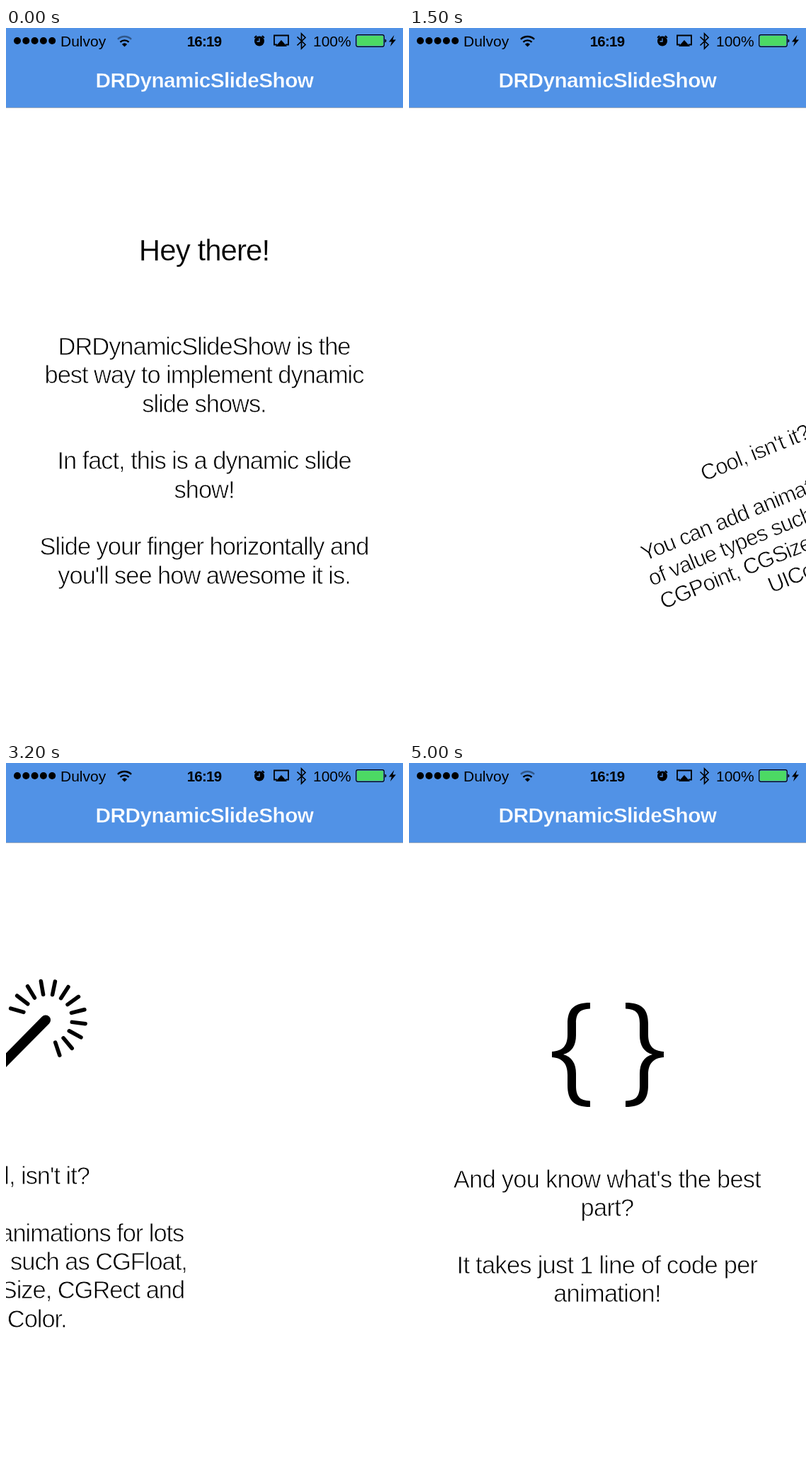
Write an HTML page that moves like this. It is 561 px wide and 997 px high and loops after 5.1 s.

```html
<!DOCTYPE html>
<html lang="en">
<head>
<meta charset="utf-8">
<title>DRDynamicSlideShow</title>
<style>
  html, body { margin: 0; width: 100%; height: 100%; overflow: hidden; background: #fff; }
  svg { display: block; width: 100%; height: 100%; }
  text { font-family: "Liberation Sans", Arial, sans-serif; }
  .mid { text-anchor: middle; }
  .copy text { font-size: 34.5px; letter-spacing: -1.05px; stroke: #fff; stroke-width: .8px; }
  #outro text { letter-spacing: -.75px; }
  .head { font-size: 42px; letter-spacing: -.95px; stroke: #fff; stroke-width: .3px; }
  .nav { font-size: 29.8px; font-weight: 700; letter-spacing: -.55px; fill: #fff; stroke: #5192e6; stroke-width: .4px; }
  .status { font-size: 21px; }
  .clock { font-size: 20.4px; font-weight: 700; letter-spacing: -.7px; }
</style>
</head>
<body>
<svg viewBox="0 0 561 997">
  <rect width="561" height="997" fill="#fff"/>

  <text id="title" class="head mid" x="280" y="328">Hey there!</text>
  <g id="intro" class="copy mid"></g>

  <g id="wand" stroke="#000" stroke-linecap="round">
    <path d="M204 468L308.5 362.5" stroke-width="14"/>
    <path id="rays" stroke-width="5.5"/>
  </g>
  <g id="tip" class="copy mid"></g>

  <g id="braces">
    <path id="brace" d="M256 338C233 338 224 347 224 368V383C224 399 217 406 202 407V415C217 416 224 424 224 440V454C224 476 233 485 256 485V476.5C241 476 236 470 236 455V438C236 424 230 414 218 411C230 408 236 398 236 384V367C236 353 241 347 256 346.5Z"/>
    <use href="#brace" transform="matrix(-1 0 0 1 562 0)"/>
  </g>
  <g id="outro" class="copy mid"></g>

  <rect y="112" width="561" height="1" fill="#b2b2b2"/>
  <rect width="561" height="112.2" fill="#5192e6"/>
  <text class="nav mid" x="280.5" y="84">DRDynamicSlideShow</text>

  <g id="dots"></g>
  <text class="status" x="77" y="26">Dulvoy</text>
  <g fill="none" stroke="#000" stroke-width="2.3">
    <path id="wifi" d="M157.9 15.8A14 14 0 0 1 177.1 15.8"/>
    <path d="M161.4 19.8A8.8 8.8 0 0 1 173.6 19.8"/>
  </g>
  <path d="M167.5 26.5L163.9 22.9A5.4 5.4 0 0 1 171.1 22.9Z"/>
  <text class="clock mid" x="280" y="26">16:19</text>

  <circle cx="358" cy="18.5" r="7"/>
  <path d="M351.7 13.3L353.6 11.6M364.3 13.3L362.4 11.6" stroke="#000" stroke-width="2" stroke-linecap="round"/>
  <path d="M358 14.5V19H354.5" fill="none" stroke="#5192e6" stroke-width="1.3"/>
  <path d="M383 23.5H379V10.5H399V23.5H395" fill="none" stroke="#000" stroke-width="1.8"/>
  <path d="M389 17L397 26H381Z"/>
  <path d="M411.5 12.5L423 23.5L417.5 29V8L423 13.5L411.5 24.5" fill="none" stroke="#000" stroke-width="1.7"/>
  <text class="status" x="434" y="26">100%</text>
  <rect x="494.7" y="9.7" width="39.6" height="16.6" rx="2.5" fill="none" stroke="#000" stroke-width="1.2"/>
  <rect x="496" y="11" width="37" height="14" rx="1.2" fill="#4cd964"/>
  <path d="M535.5 15.5Q537.5 16 537.5 18T535.5 20.5Z"/>
  <path d="M548.5 10L541 19.5H545L543 26L551 16.5H546.5Z"/>
</svg>
<script>
const LOOP = 5100, STEP = 100, W = 561, H = 997, LINE = 40.35;
const TILT = 0.9, PIVOT = [280, 683];
const $ = id => document.getElementById(id);
const clamp = v => Math.min(1, Math.max(0, v));
const mix = (a, b, k) => a + (b - a) * k;

// Scroll position in pages: a slow drag, then a quick swipe
const scroll = [
  [600, 0], [1200, .25], [1300, .34], [1400, .45], [1500, .567], [1600, .73],
  [1700, .88], [1800, .955], [1900, .99], [2000, 1],
  [2900, 1], [3000, 1.084], [3100, 1.24], [3200, 1.45], [3300, 1.668],
  [3400, 1.834], [3500, 1.917], [3600, 1.959], [3700, 1.981], [3800, 1.992], [3900, 2]
];

function pageAt(t) {
  const i = scroll.findIndex(k => k[0] > t);
  if (i === 0) return 0;
  if (i < 0) return 2;
  const [t0, p0] = scroll[i - 1], [t1, p1] = scroll[i];
  return mix(p0, p1, (t - t0) / (t1 - t0));
}

function add(parent, tag, attrs, label = "") {
  const el = document.createElementNS("http://www.w3.org/2000/svg", tag);
  for (const k in attrs) el.setAttribute(k, attrs[k]);
  el.textContent = label;
  parent.append(el);
}

function paragraph(id, y, lines) {
  lines.forEach((s, i) => s && add($(id), "text", { x: 280, y: y + i * LINE }, s));
}

paragraph("intro", 461, [
  "DRDynamicSlideShow is the", "best way to implement dynamic", "slide shows.", "",
  "In fact, this is a dynamic slide", "show!", "",
  "Slide your finger horizontally and", "you'll see how awesome it is."
]);
paragraph("tip", 594, [
  "Cool, isn't it?", "", "You can add animations for lots",
  "of value types such as CGFloat,", "CGPoint, CGSize, CGRect and", "UIColor."
]);
paragraph("outro", 598.8, [
  "And you know what's the best", "part?", "",
  "It takes just 1 line of code per", "animation!"
]);

for (let i = 0; i < 5; i++) add($("dots"), "circle", { cx: 16 + i * 12.3, cy: 18, r: 5 });

let rays = "";
for (let i = 0; i < 12; i++) {
  const a = (196 + i * 21.4) * Math.PI / 180;
  const at = r => `${311 + r * Math.cos(a)} ${361 + r * Math.sin(a)}`;
  rays += `M${at(35)}L${at(54)}`;
}
$("rays").setAttribute("d", rays);

const place = (id, x, y) => $(id).setAttribute("transform", `translate(${x} ${y})`);
const fade = (id, k) => $(id).setAttribute("opacity", clamp((k - .75) / .25));

function draw(t) {
  const page = pageAt(t), a = clamp(page), b = clamp(page - 1);
  const x = W * (1 - a - b);

  place("title", 0, -H * a);
  place("intro", 0, 2 * H * a);

  // The tilt matrix is blended entry by entry, so the text also shrinks a little
  const c = mix(Math.cos(TILT), 1, a), s = mix(Math.sin(TILT), 0, a);
  const [px, py] = PIVOT;
  $("tip").setAttribute("transform",
    `translate(${px + x} ${py}) matrix(${c} ${-s} ${s} ${c} 0 0) translate(${-px} ${-py})`);
  place("wand", x, 0);
  fade("wand", a);

  place("braces", W * (1 - b), 0);
  fade("braces", b);
  place("outro", 0, H * (1 - b));

  $("wifi").setAttribute("stroke-opacity", t < 600 || t >= 4300 ? .4 : 1);
}

function tick() {
  draw(Math.floor(performance.now() % LOOP / STEP) * STEP);
  requestAnimationFrame(tick);
}
tick();
</script>
</body>
</html>
```
